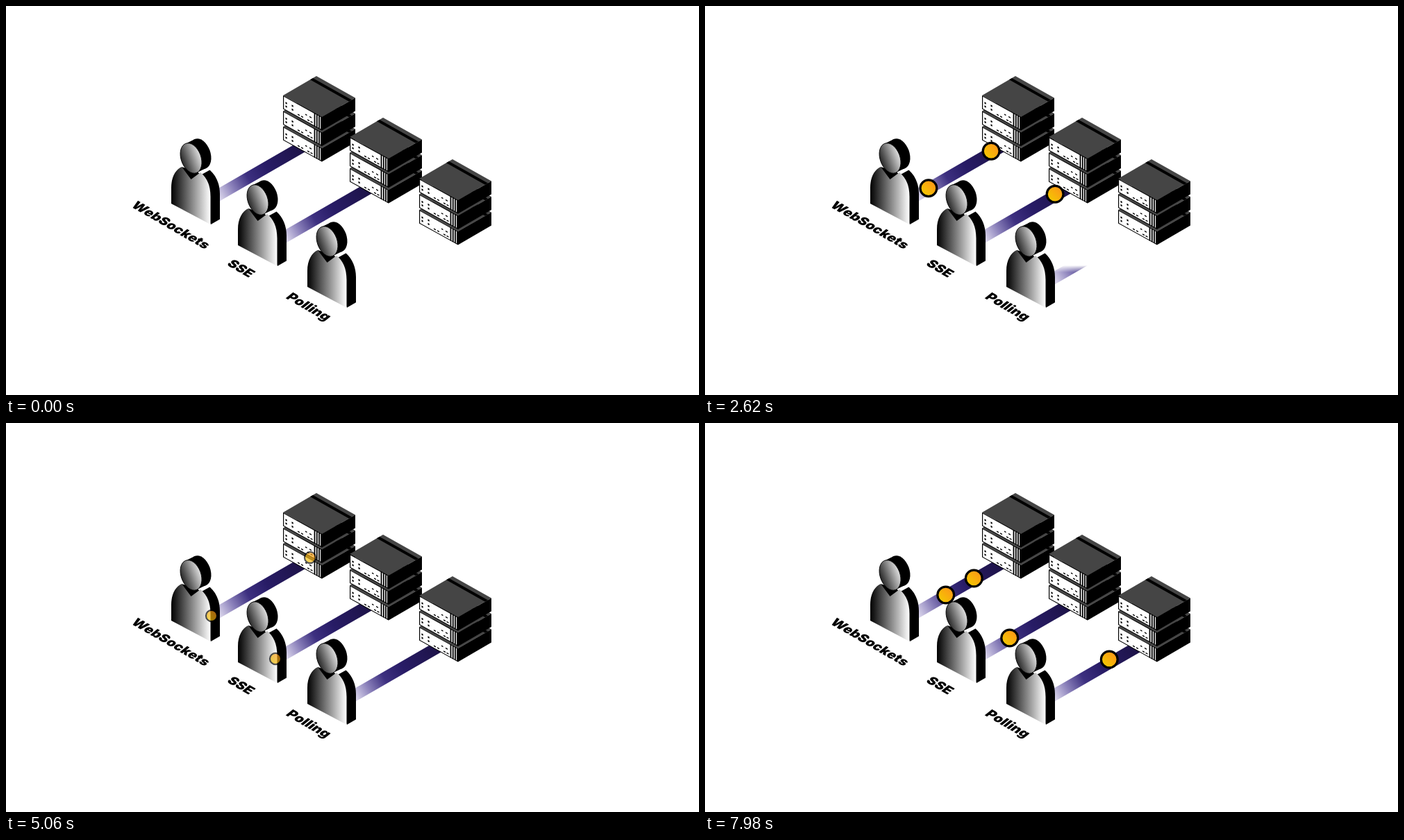
These frames come from a looping animation (998x561 px, 8000 ms). An HTML page:

```html
<!DOCTYPE html>
<html lang="en">
<head>
<meta charset="utf-8">
<title>Connection styles</title>
<style>
  html, body { margin: 0; width: 100%; height: 100%; overflow: hidden; background: #fff; }
  svg { display: block; width: 100%; height: 100%; }
  text { font: 900 19.5px Inter, sans-serif; }
</style>
</head>
<body>
<svg viewBox="0 0 998 561">
  <defs>
    <linearGradient id="bodyShade">
      <stop offset="0"/>
      <stop offset="1" stop-color="#fff"/>
    </linearGradient>
    <linearGradient id="headShade">
      <stop offset="0" stop-color="#262626"/>
      <stop offset="1" stop-color="#e0e0e0"/>
    </linearGradient>
    <linearGradient id="beamShade" gradientUnits="userSpaceOnUse" x1="306" y1="273" x2="432" y2="200">
      <stop offset="0" stop-color="#d8d3ea"/>
      <stop offset=".16" stop-color="#8a80ba"/>
      <stop offset=".34" stop-color="#3d3080"/>
      <stop offset=".55" stop-color="#281c66"/>
      <stop offset="1" stop-color="#1c1244"/>
    </linearGradient>
    <linearGradient id="dotShade" x1="0" y1="1" x2="1" y2="0">
      <stop offset=".1" stop-color="#f2cb00"/>
      <stop offset=".9" stop-color="#ff9418"/>
    </linearGradient>
    <linearGradient id="wipe" gradientUnits="userSpaceOnUse" x1="0" x2="0" y1="0" y2="10">
      <stop offset="0" stop-color="#000"/>
      <stop offset="1" stop-color="#fff"/>
    </linearGradient>
    <mask id="wipeMask" maskUnits="userSpaceOnUse" x="0" y="0" width="998" height="561">
      <rect width="998" height="561" fill="url(#wipe)"/>
    </mask>

    <path id="beam" d="M304 264 L420 197 L440 205 L304 283.5Z" fill="url(#beamShade)"/>

    <g id="unit">
      <path d="M399 129 L447 101 L503 132.5 L455 160Z" fill="#454545"/>
      <path d="M438 106.3 L442 104 L498 135.5 L494 137.8Z"/>
      <path d="M455 160 L503 132.5 V151.5 L455 179.5Z"/>
      <g transform="matrix(1 .554 0 1 399 129)">
        <rect x=".6" y=".6" width="54.8" height="18.3" fill="#fff" stroke="#000" stroke-width="1.2"/>
        <path d="M3.5 8.5h2.2M3.5 13.5h2.2M12.5 7.5h2.2M12.5 13h2.2" stroke="#000" stroke-width="2.4"/>
        <path d="M21 15.5h3M26 15.5h3M35 15.5h3M39.5 15.5h3M32 9.5h2.5M38 9.5h3" stroke="#000" stroke-width="1.5"/>
        <path d="M45.5 0v19.5M48.8 0v19.5M52 0v19.5M55 0v19.5" stroke="#000" stroke-width="1.8"/>
      </g>
    </g>
    <g id="server">
      <use href="#unit" y="45"/>
      <use href="#unit" y="22.5"/>
      <use href="#unit"/>
    </g>

    <g id="user">
      <path d="M253 232 L276 239 L280 244 L293.5 236.5 C303 245 308 257 308 271 V307.5 L295 315 L266 260Z"/>
      <path d="M238 285 V262 C238 247 244 236 253 232 L266.5 250 L280 240 C289 247 294.5 258 294.5 275 V315Z" fill="url(#bodyShade)"/>
      <ellipse rx="14.3" ry="22.5" transform="translate(280 213) rotate(-20)"/>
      <path d="M258.1 198.7 L271.6 192.2 L288.4 233.8 L274.9 240.3Z"/>
      <ellipse rx="14.3" ry="22.5" transform="translate(266.5 219.5) rotate(-20)" fill="url(#headShade)" stroke="#000" stroke-width=".8"/>
    </g>
    <circle id="dot" r="11.9" fill="url(#dotShade)" stroke="#000" stroke-width="3.2"/>
  </defs>

  <rect width="998" height="561" fill="#fff"/>
  <use href="#beam"/>
  <use href="#beam" x="96" y="60"/>
  <g mask="url(#wipeMask)" id="pollingBeam"><use href="#beam" x="196" y="120"/></g>

  <use href="#server"/>
  <use href="#server" x="96" y="60"/>
  <use href="#server" x="196" y="120"/>
  <use href="#user"/>
  <use href="#user" x="96" y="60"/>
  <use href="#user" x="196" y="120"/>

  <text transform="matrix(.866 .5 -.75 .6 179 289)">WebSockets</text>
  <text transform="matrix(.866 .5 -.75 .6 317 373)">SSE</text>
  <text transform="matrix(.866 .5 -.75 .6 402 421)">Polling</text>
  <g id="dots"></g>
</svg>
<script>
const LOOP = 8000, STEP = 40, FIRST_TRIP = 540, TRIP = 4890;
const REST = 13.5, PEAK = 21;
const SPAN = { x: 142, y: -84 };

// Each dot starts at its user end or, when reversed, at its server end.
const dots = [
  { x: 296, y: 278, reversed: false, from: 0 },
  { x: 296, y: 278, reversed: true, from: 0 },
  { x: 388, y: 340, reversed: true, from: 0 },
  { x: 491, y: 395, reversed: false, from: 1 }
];
const layer = document.getElementById('dots');
for (const dot of dots) {
  dot.node = document.createElementNS('http://www.w3.org/2000/svg', 'use');
  dot.node.setAttribute('href', '#dot');
  layer.append(dot.node);
}
const wipe = document.getElementById('wipe');
const pollingBeam = document.getElementById('pollingBeam');

const clamp = v => Math.min(1, Math.max(0, v));
const phase = (t, start, end) => clamp((t - start) / (end - start));
const sine = v => (1 - Math.cos(Math.PI * v)) / 2;
const quad = v => v < .5 ? 2 * v * v : 1 - 2 * (1 - v) ** 2;
const mix = (a, b, v) => a + (b - a) * v;

function radius(t) {
  if (t < 930) return PEAK * (1 - (1 - t / 930) ** 1.38);
  if (t < 3250) return mix(PEAK, REST, sine(phase(t, 930, 1400)));
  if (t < 4000) return mix(REST, PEAK, sine(phase(t, 3250, 4000)));
  return mix(PEAK, 0, sine(phase(t, 4000, 4960)));
}

function draw(time) {
  const elapsed = time - FIRST_TRIP;
  const trip = Math.floor(elapsed / TRIP);
  const t = elapsed - trip * TRIP;
  const progress = quad(phase(t, 1565, 3271));
  const opacity = Math.min(phase(t, 0, 400), 1 - phase(t, 4330, 4900));
  const scale = radius(t) / REST;

  for (const { x, y, reversed, from, node } of dots) {
    const p = reversed ? 1 - progress : progress;
    node.setAttribute('transform', `translate(${x + SPAN.x * p} ${y + SPAN.y * p}) scale(${scale})`);
    node.setAttribute('opacity', trip >= from ? opacity : 0);
  }

  const cut = time > 3900 ? 290 : 374 - (time - 2620) * .0524;
  wipe.setAttribute('y1', cut);
  wipe.setAttribute('y2', cut + 10);
  pollingBeam.setAttribute('visibility', time < 2240 ? 'hidden' : 'visible');
}

const origin = performance.now();
function tick() {
  const time = (performance.now() - origin) % LOOP;
  draw(Math.max(0, Math.floor((time - 20) / STEP) * STEP + 20));
  requestAnimationFrame(tick);
}
tick();
</script>
</body>
</html>
```
